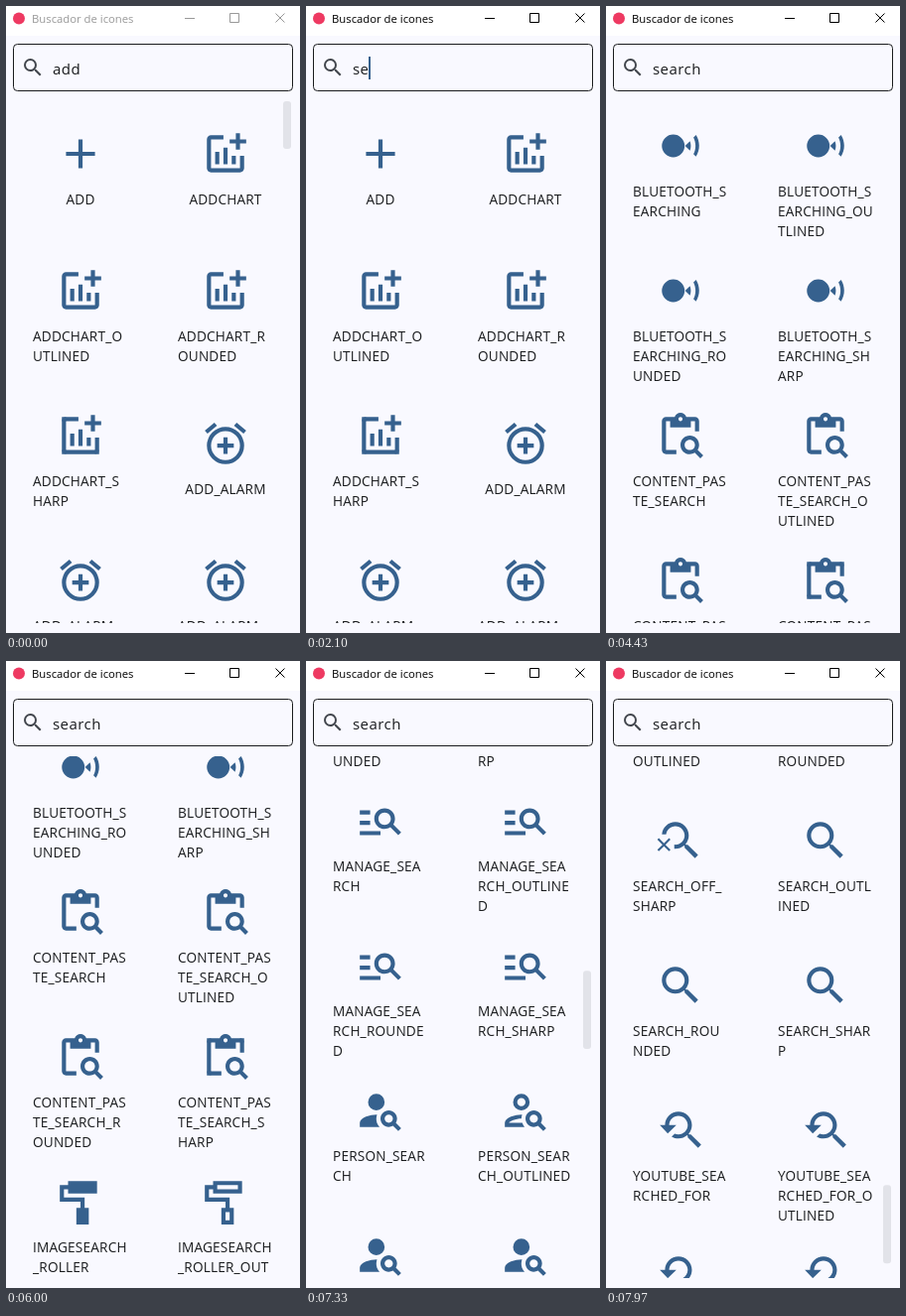
Animation, 296 px wide and 632 px high, one loop 8000 ms. Source, as an HTML page:

```html
<!DOCTYPE html>
<html lang="pt">
<head>
<meta charset="utf-8">
<title>Buscador de icones</title>
<style>
  html, body { margin: 0; width: 100%; height: 100%; overflow: hidden; background: #f9f9ff; }
  svg { display: block; font-family: "Open Sans", "Noto Sans", sans-serif; }
  .title { font-size: 11.3px; }
  .query { font-size: 15px; letter-spacing: .45px; fill: #1a1c1e; }
  .label { font-size: 13.6px; letter-spacing: .2px; fill: #1a1c1e; }
  .one { text-anchor: middle; }
  .icon, .caret { fill: #36618e; }
  .thumb { fill: #e2e3e9; }
</style>
</head>
<body>
<svg id="stage" width="296" height="632" viewBox="0 0 296 632">
  <clipPath id="view"><rect y="96" width="296" height="526"/></clipPath>
  <rect width="296" height="30" fill="#fff"/>
  <circle cx="13" cy="12.5" r="6" fill="#ee3a62"/>
  <g id="bar">
    <text class="title" x="26" y="17">Buscador de icones</text>
    <path d="M180 12.5h10M225.5 7.5h9v9h-9zM271.5 7.5l9 9m0-9l-9 9" fill="none" stroke="currentColor"/>
  </g>
  <rect x="7.5" y="38.5" width="281" height="47" rx="4" fill="none" stroke="#1a1c1e"/>
  <g id="lens" fill="#43474e"></g>
  <rect id="mark" x="47" y="52" height="21" fill="#b3b8c2"/>
  <text id="query" class="query" x="47" y="69"></text>
  <rect id="caret" class="caret" y="51" width="2" height="23"/>
  <g clip-path="url(#view)">
    <g id="before"></g>
    <g id="after"></g>
  </g>
  <rect id="thumb" class="thumb" x="279" width="8" rx="3"/>
</svg>
<script>
const LOOP = 8000, TOP = 96, PITCH = 146, NOTCH = 180;
const $ = id => document.getElementById(id);

const search = 'M15.5 14h-.79l-.28-.27A6.47 6.47 0 0 0 16 9.5 6.5 6.5 0 1 0 9.5 16c1.61 0 3.09-.59 4.23-1.57l.27.28v.79l5 4.99L20.49 19zm-6 0C7.01 14 5 11.99 5 9.5S7.01 5 9.5 5 14 7.01 14 9.5 11.99 14 9.5 14z';
const finder = 'M19.43 18.02c.36-.59.57-1.28.57-2.02 0-2.21-1.79-4-4-4s-4 1.79-4 4 1.79 4 4 4c.74 0 1.43-.22 2.02-.57L20.59 22 22 20.59zM16 18c-1.1 0-2-.9-2-2s.9-2 2-2 2 .9 2 2-.9 2-2 2z';
const icons = {
  search,
  add: 'M19 13h-6v6h-2v-6H5v-2h6V5h2v6h6z',
  chart: 'M22 5v2h-3v3h-2V7h-3V5h3V2h2v3zM19 19H5V5h6V3H5c-1.1 0-2 .9-2 2v14c0 1.1.9 2 2 2h14c1.1 0 2-.9 2-2v-6h-2zM15 13v4h2v-4zM11 17h2V9h-2zM9 17v-6H7v6z',
  alarm: 'M7.88 3.39L6.6 1.86 2 5.71l1.29 1.53zM22 5.72l-4.6-3.86-1.29 1.53 4.6 3.86zM12 4a9 9 0 1 0 0 18 9 9 0 0 0 0-18zm0 16a7 7 0 1 1 0-14 7 7 0 0 1 0 14zM13 9h-2v3H8v2h3v3h2v-3h3v-2h-3z',
  waves: 'M8.5 6.5a5.5 5.5 0 1 0 0 11 5.5 5.5 0 0 0 0-11zM14.24 12.01l2.32 2.32c.28-.72.44-1.51.44-2.33s-.16-1.59-.43-2.31zM19.53 6.71l-1.26 1.26c.63 1.21.98 2.57.98 4.02s-.36 2.82-.98 4.02l1.2 1.2c.97-1.54 1.54-3.36 1.54-5.31-.01-1.89-.55-3.67-1.48-5.19z',
  paste: 'M5 5h2v3h10V5h2v5h2V5c0-1.1-.9-2-2-2h-4.18C14.4 1.84 13.3 1 12 1S9.6 1.84 9.18 3H5c-1.1 0-2 .9-2 2v14c0 1.1.9 2 2 2h5v-2H5zM12 3c.55 0 1 .45 1 1s-.45 1-1 1-1-.45-1-1 .45-1 1-1zM20.3 18.9c.4-.7.7-1.5.7-2.4 0-2.5-2-4.5-4.5-4.5S12 14 12 16.5s2 4.5 4.5 4.5c.9 0 1.7-.3 2.4-.7l2.7 2.7 1.4-1.4zM16.5 19c-1.4 0-2.5-1.1-2.5-2.5s1.1-2.5 2.5-2.5 2.5 1.1 2.5 2.5-1.1 2.5-2.5 2.5z',
  roller: 'M20 2v6H6V6H4v4h10v5h2v8h-6v-8h2v-3H2V4h4V2z',
  rollerLine: 'M20 2H6v2H2v8h10v3h-2v8h6v-8h-2v-5H4V6h2v2h14zM8 4h10v2H8zM12 17h2v4h-2z',
  image: 'M18 13v7H4V6h5.02c.05-.71.22-1.38.48-2H4c-1.1 0-2 .9-2 2v14c0 1.1.9 2 2 2h14c1.1 0 2-.9 2-2v-5zm-1.5 5h-11l2.75-3.53 1.96 2.36 2.75-3.54zm2.8-9.11c.44-.7.7-1.51.7-2.39C20 4.01 17.99 2 15.5 2S11 4.01 11 6.5s2.01 4.5 4.49 4.5c.88 0 1.7-.26 2.39-.7L21 13.42 22.42 12zM15.5 9C14.12 9 13 7.88 13 6.5S14.12 4 15.5 4 18 5.12 18 6.5 16.88 9 15.5 9z',
  target: 'M20.94 11A9 9 0 0 0 13 3.06V1h-2v2.06A9 9 0 0 0 3.06 11H1v2h2.06A9 9 0 0 0 11 20.94V23h2v-2.06A9 9 0 0 0 20.94 13H23v-2zM12 19a7 7 0 1 1 0-14 7 7 0 0 1 0 14z',
  manage: 'M7 9H2V7h5zm0 3H2v2h5zm13.59 7l-3.83-3.83c-.8.52-1.74.83-2.76.83-2.76 0-5-2.24-5-5s2.24-5 5-5 5 2.24 5 5c0 1.02-.31 1.96-.83 2.75L22 17.59zM17 11c0-1.65-1.35-3-3-3s-3 1.35-3 3 1.35 3 3 3 3-1.35 3-3zM2 19h10v-2H2z',
  person: finder + 'M10 4a4 4 0 1 0 0 8 4 4 0 0 0 0-8zM10.35 14.01C7.62 13.91 2 15.27 2 18v2h9.54c-2.47-2.76-1.23-5.89-1.19-5.99z',
  personLine: finder + 'M10 4a4 4 0 1 0 0 8 4 4 0 0 0 0-8zm0 6a2 2 0 1 1 0-4 2 2 0 0 1 0 4zM10.35 14.01C7.62 13.91 2 15.27 2 18v2h9.54c-.5-.56-.86-1.28-1.1-2H4c.22-.72 3.31-2 6-2 .01-.78.17-1.46.35-1.99z',
  saved: search + 'M9.5 6l.9 2.5H13l-2.1 1.6.8 2.5-2.2-1.5-2.2 1.5.8-2.5L6 8.5h2.6z',
  screen: 'M20 18c1.1 0 2-.9 2-2V5c0-1.1-.9-2-2-2H4c-1.1 0-2 .9-2 2v11c0 1.1.9 2 2 2H0v2h24v-2zm0-2H4V5h16zM11.5 6.5a3.5 3.5 0 1 0 1.8 6.5l2 2 1.1-1.1-2-2a3.5 3.5 0 0 0-2.9-5.4zm0 5.5a2 2 0 1 1 0-4 2 2 0 0 1 0 4z',
  off: 'M15.5 14h-.79l-.28-.27A6.47 6.47 0 0 0 16 9.5C16 5.91 13.09 3 9.5 3 6.08 3 3.28 5.64 3.03 9h2.02C5.3 6.75 7.18 5 9.5 5c2.49 0 4.5 2.01 4.5 4.5S11.99 14 9.5 14c-.17 0-.33-.03-.5-.05v2.02c.17.02.33.03.5.03 1.61 0 3.09-.59 4.23-1.57l.27.28v.79l5 4.99L20.49 19zM6.47 10.82L4 13.29l-2.47-2.47-.71.71L3.29 14 .82 16.47l.71.71L4 14.71l2.47 2.47.71-.71L4.71 14l2.47-2.47z',
  again: 'M17.01 14h-.8l-.27-.27c.98-1.14 1.57-2.61 1.57-4.23 0-3.59-2.91-6.5-6.5-6.5s-6.5 3-6.5 6.5H2l3.84 4 4.16-4H6.51C6.51 7 8.53 5 11.01 5s4.5 2.01 4.5 4.5-2.02 4.5-4.5 4.5c-.65 0-1.26-.14-1.82-.38L7.71 15.1c.97.57 2.09.9 3.3.9 1.61 0 3.08-.59 4.22-1.57l.27.27v.79l5.01 4.99L22 19z'
};
// Square corners of the sharp variants
const corners = {
  chart: ['3 3', '3 19', '19 19'],
  paste: ['3 3', '19 3', '3 19'],
  image: ['2 4', '2 20', '18 20']
};

// "|" marks a line break inside a label
const family = (icon, base, ...ends) =>
  ['', ...ends].map((end, i) => ({ icon: i === 1 && icons[icon + 'Line'] ? icon + 'Line' : icon, label: base + end, sharp: i === 3 }));

const addList = [
  ...family('add', 'ADD'),
  ...family('chart', 'ADDCHART', '_O|UTLINED', '_R|OUNDED', '_S|HARP'),
  ...family('alarm', 'ADD_ALARM', '_|OUTLINED', '_|ROUNDED')
];
const searchList = [
  ...family('waves', 'BLUETOOTH_S|EARCHING', '_OU|TLINED', '_RO|UNDED', '_SH|ARP'),
  ...family('paste', 'CONTENT_PAS|TE_SEARCH', '_O|UTLINED', '_R|OUNDED', '_S|HARP'),
  ...family('roller', 'IMAGESEARCH|_ROLLER', '_OUT|LINED', '_ROU|NDED', '_SHA|RP'),
  ...family('image', 'IMAGE_SEARC|H', '_OUTLINED', '_ROUNDED', '_SHARP'),
  ...family('target', 'LOCATION_SE|ARCHING', '_OUT|LINED', '_RO|UNDED', '_SHA|RP'),
  ...family('manage', 'MANAGE_SEA|RCH', '_OUTLINE|D', '_ROUNDE|D', '_SHARP'),
  ...family('person', 'PERSON_SEAR|CH', '_OUTLINED', '_ROUNDED', '_SHARP'),
  ...family('saved', 'SAVED_SEARC|H', '_OUTLINED', '_ROUNDED', '_SHARP'),
  ...family('screen', 'SCREEN_SEAR|CH_DESKTOP', '_|OUTLINED', '_|ROUNDED', '_|SHARP'),
  ...family('search', 'SEARCH'),
  ...family('off', 'SEARCH_OFF', '_|OUTLINED', '_|ROUNDED', '_|SHARP'),
  ...family('search', 'SEARCH', '_OUTL|INED', '_ROU|NDED', '_SHAR|P').slice(1),
  ...family('again', 'YOUTUBE_SEA|RCHED_FOR', '_O|UTLINED', '_R|OUNDED', '_S|HARP')
];

function cell({ icon, label, sharp }, i) {
  const lines = label.split('|'), one = lines.length === 1;
  const cx = 75 + i % 2 * PITCH;
  const cy = TOP + 45 + (i >> 1) * PITCH + (one ? 8 : 0);
  const square = (sharp && corners[icon] || []).map(p => `M${p}h2v2h-2z`).join('');
  const text = lines.map((s, n) =>
    `<text class="label${one ? ' one' : ''}" x="${one ? cx : cx - 48}" y="${cy + 51 + n * 20}">${s}</text>`).join('');
  return `<g class="icon" transform="translate(${cx - 25} ${cy - 25}) scale(${50 / 24})">` +
    `<path fill-rule="evenodd" d="${icons[icon]}"/><path d="${square}"/></g>${text}`;
}

$('before').innerHTML = addList.map(cell).join('');
$('after').innerHTML = searchList.map(cell).join('');
$('lens').innerHTML = `<path transform="translate(15 50)" d="${search}"/>`;

const keys = [1770, 2000, 2300, 2630, 3070, 3270];
const wheel = [6000, 6200, 6370, 6530, 6800, 6900, 7170, 7270, 7500, 7570, 7600, 7670, 7830, 7870, 7930, 7970];
const passed = (times, t) => times.filter(x => t >= x).length;
const clamp = x => Math.max(0, Math.min(1, x));
const set = (id, attrs) => { for (const k in attrs) $(id).setAttribute(k, attrs[k]); };

const range = Math.ceil(searchList.length / 2) * PITCH;
const view = 526, thumbLen = view * view / range;

function draw(t) {
  const ink = t < 560 ? '#999' : '#000';
  set('bar', { fill: ink, color: ink });

  const typed = passed(keys, t);
  const word = typed ? 'search'.slice(0, typed) : 'add';
  if ($('query').textContent !== word) $('query').textContent = word;
  const width = $('query').getComputedTextLength();
  set('mark', { width, opacity: t >= 730 && !typed ? 1 : 0 });
  set('caret', { x: Math.round(47 + width), opacity: typed && t < 3730 ? 1 : 0 });

  const found = t >= 4300;
  const y = passed(wheel, t) * NOTCH;
  set('before', { display: found ? 'none' : 'inline' });
  set('after', { display: found ? 'inline' : 'none', transform: `translate(0 ${-y})` });
  set('thumb', {
    y: TOP + y * (view - thumbLen) / (range - view),
    height: found ? thumbLen : 48,
    opacity: found ? clamp((t - 6000) / 300) : clamp((800 - t) / 300)
  });
}

const start = performance.now();
function tick() {
  draw((performance.now() - start) % LOOP);
  requestAnimationFrame(tick);
}
tick();
</script>
</body>
</html>
```
